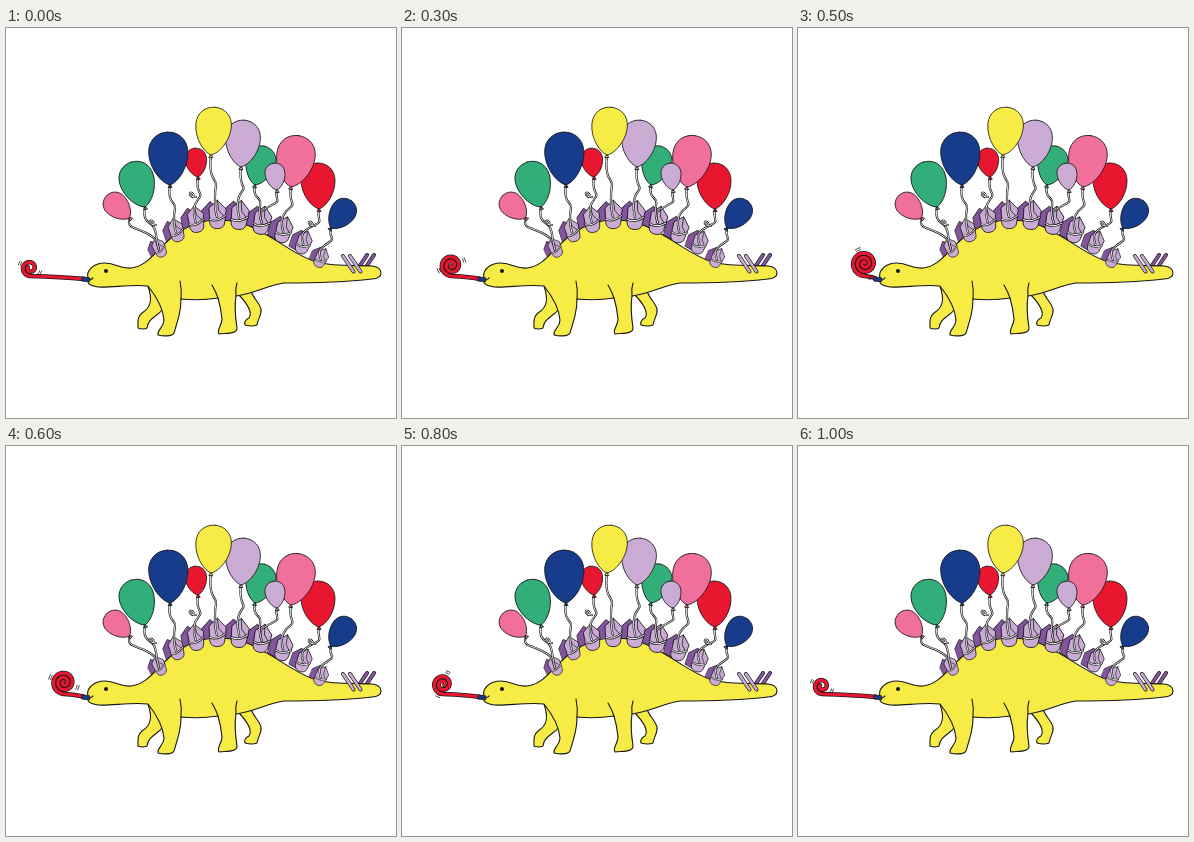
Recreate the animation shown at these times as an HTML page. Size 390 px wide and 390 px high, loop 1.1 s.

```html
<!DOCTYPE html>
<html lang="en">
<head>
<meta charset="utf-8">
<title>Party stegosaurus</title>
<style>
html, body { margin: 0; width: 100%; height: 100%; overflow: hidden; background: #fff; }
svg { display: block; width: 100vw; height: 100vh; }
path { stroke-linejoin: round; stroke-linecap: round; }
</style>
</head>
<body>
<svg id="stage" viewBox="0 0 390 390"></svg>
<script>
const red = '#e8172f', pink = '#f0709b', green = '#32af79', blue = '#183c8c';
const yellow = '#f7ec46', lilac = '#c9abd3', purple = '#84549f', ink = '#171717';
const stage = document.getElementById('stage');

const shape = (d, fill, width = 1.1) =>
  `<path d="${d}" fill="${fill}" stroke="${ink}" stroke-width="${width}"/>`;
const line = (d, width) => shape(d, 'none', width);
const place = (x, y, turn, size, parts) =>
  `<g transform="translate(${x} ${y}) rotate(${turn}) scale(${size})">${parts}</g>`;
const repeat = (n, draw) => Array.from({ length: n }, (_, i) => draw(i)).join('');

// A coloured stroke with a dark edge on both sides
const tube = (d, color, outer, inner) => [[ink, outer], [color, inner]].map(([c, w]) =>
  `<path d="${d}" fill="none" stroke="${c}" stroke-width="${w}"/>`).join('');
const string = d => tube(d, '#fff', 2.2, .9);

// The row of plates follows one cubic curve along the back
const spine = [[153, 220], [194, 164], [272, 186], [315, 230]];
function backAt(t) {
  const u = 1 - t;
  const at = j => u * u * u * spine[0][j] + 3 * u * u * t * spine[1][j] +
    3 * u * t * t * spine[2][j] + t * t * t * spine[3][j];
  const slope = j => u * u * (spine[1][j] - spine[0][j]) +
    2 * u * t * (spine[2][j] - spine[1][j]) + t * t * (spine[3][j] - spine[2][j]);
  return {
    x: at(0), y: at(1),
    turn: Math.atan2(slope(1), slope(0)) * 90 / Math.PI,
    size: .75 + .33 * Math.sin(Math.PI * t)
  };
}
function plate(t, parts) {
  const { x, y, turn, size } = backAt(t);
  return place(x, y, turn, size, parts);
}
const lastPlate = 8;
const darkPlate = i => plate(i / lastPlate, shape('M-14 9L-4 11 0 -7 -6 -13 -14 -5Z', purple, .8));
const lightPlate = i => plate(i / lastPlate,
  shape('M-7 8Q-6 13 0 13 6 13 7 8L9 -5 1 -14 -7 -7Z', lilac, .8) +
  line('M1 -14L2 -4 7 2', .7) + string('M-7 4Q0 7 8 1'));

// Left to right: colour, knot, height and tilt
const balloons = [
  [pink, 123.5, 190, 32, -46], [green, 139, 179, 47, -17], [blue, 164, 157, 53, -3],
  [red, 192, 149, 29, -7], [yellow, 205, 127, 48, 5], [lilac, 235, 139, 47, 4],
  [lilac, 271, 162, 27, -7], [green, 249, 157, 40, 14], [pink, 285, 159, 52, 9],
  [red, 313, 181, 46, -2], [blue, 325, 200, 34, 37]
];

function balloon([color, x, y, h, tilt]) {
  const w = h * .37;
  const half = s => `M0 0C${s * w * .42} ${-h * .04} ${s * w} ${-h * .32} ${s * w} ${-h * .62}` +
    `C${s * w} ${-h * .85} ${s * w * .56} ${-h} 0 ${-h}`;
  return place(x, y, tilt, 1, shape('M-1.8 2.2L0 -.8 1.8 2.2Z', color, .8) +
    shape(half(1) + half(-1), color, .8));
}

function tether([, x, y], i) {
  const end = backAt(Math.round((i - .5) * .84) / lastPlate);
  const mid = (y + end.y) / 2;
  return string(`M${x} ${y}C${x - 3} ${mid - 4} ${x + 6} ${mid - 6} ${(x + end.x) / 2 + 2} ${mid}` +
    `S${end.x - 3} ${end.y - 8} ${end.x} ${end.y + 2}`);
}
const curl = ([x, y]) => string(`M${x + 4} ${y + 2}C${x - 4} ${y + 2} ${x - 3} ${y - 4} ${x} ${y - 2}Q${x + 3} ${y} ${x} ${y + 2}`);

const spikes = (x, y, dx, dy, color) =>
  repeat(2, i => tube(`M${x + 7 * i} ${y}l${dx} ${dy}`, color, 4, 2.5));

const body = 'M82 250C80 243 87 235 99 235C110 235 114 241 125 240C143 238 150 221 170 206' +
  'C190 192 212 189 235 195C262 203 285 226 310 234C330 239 350 237 366 238C378 239 378 251 366 251' +
  'C340 254 300 255 278 255C262 257 250 265 230 268Q228 280 231 300C231 306 222 305 213 306' +
  'C210 302 216 298 216 291Q215 280 212 270Q194 273 175 271C175 283 172 292 168 305' +
  'C166 309 156 308 152 307C151 301 158 300 158 292C157 280 150 268 142 258C125 256 105 260 92 259' +
  'C86 258 82 256 82 254Z';
const farLegs = 'M142 258C146 270 146 279 136 285C131 289 132 294 132 300Q137 302 141 300C142 290 151 289 157 281L158 265Z' +
  'M231 265C240 274 247 284 243 290C239 292 238 294 239 297Q246 299 251 297C252 290 256 287 255 281C253 274 247 270 245 263Z';

stage.innerHTML =
  spikes(361, 227, -8, 12, purple) +
  repeat(lastPlate + 1, darkPlate) +
  shape(farLegs, yellow) + shape(body, yellow) +
  line('M174 253Q176 262 175 271M206 257Q210 264 212 270M231 255Q229 261 230 268') +
  line('M81 252C84 253 86 251 87 250') +
  `<circle cx="100" cy="243" r="2" fill="${ink}"/>` +
  spikes(337, 228, 10.5, 15.5, lilac) +
  repeat(lastPlate + 1, lightPlate) +
  balloons.map(tether).join('') + [[146, 195], [186, 167], [305, 196]].map(curl).join('') +
  balloons.map(balloon).reverse().join('') + '<g id="blower"></g>';

const blower = document.getElementById('blower');
const polar = (x, y, r, deg) => {
  const a = deg * Math.PI / 180;
  return `${x + r * Math.cos(a)} ${y + r * Math.sin(a)}`;
};

// Each pose rolls the blower further up towards the mouth
function drawBlower(pose) {
  const x = 24 + 8.5 * pose, y = 240 - .9 * pose;
  const r = 8 + .9 * pose, turns = 1.3 + .27 * pose, pitch = 4.4;
  let d = `M78 251Q${(x + 78) / 2 + 5} ${y + r + 1} ${x} ${y + r}`;
  for (let i = 1; i <= 60; i++) {
    const n = turns * i / 60;
    d += 'L' + polar(x, y, r - pitch * n, 90 + 360 * n);
  }
  const mark = i => {
    const a = 205 + 44 * pose + 180 * (i >> 1), q = r + 2 + 2 * (i % 2);
    return line(`M${polar(x, y, q, a - 9)}A${q} ${q} 0 0 1 ${polar(x, y, q, a + 9)}`, .8);
  };
  blower.innerHTML = tube(d, red, 4.6, 3.2) +
    shape('M76.5 248.8L84 250 83.5 253.8 76 253Z', blue, .8) + repeat(4, mark);
}

let shown = -1;
function tick() {
  const step = Math.floor(performance.now() % 1100 / 100);
  const pose = Math.min(step, 10 - step);
  if (pose !== shown) drawBlower(shown = pose);
  requestAnimationFrame(tick);
}
tick();
</script>
</body>
</html>
```
